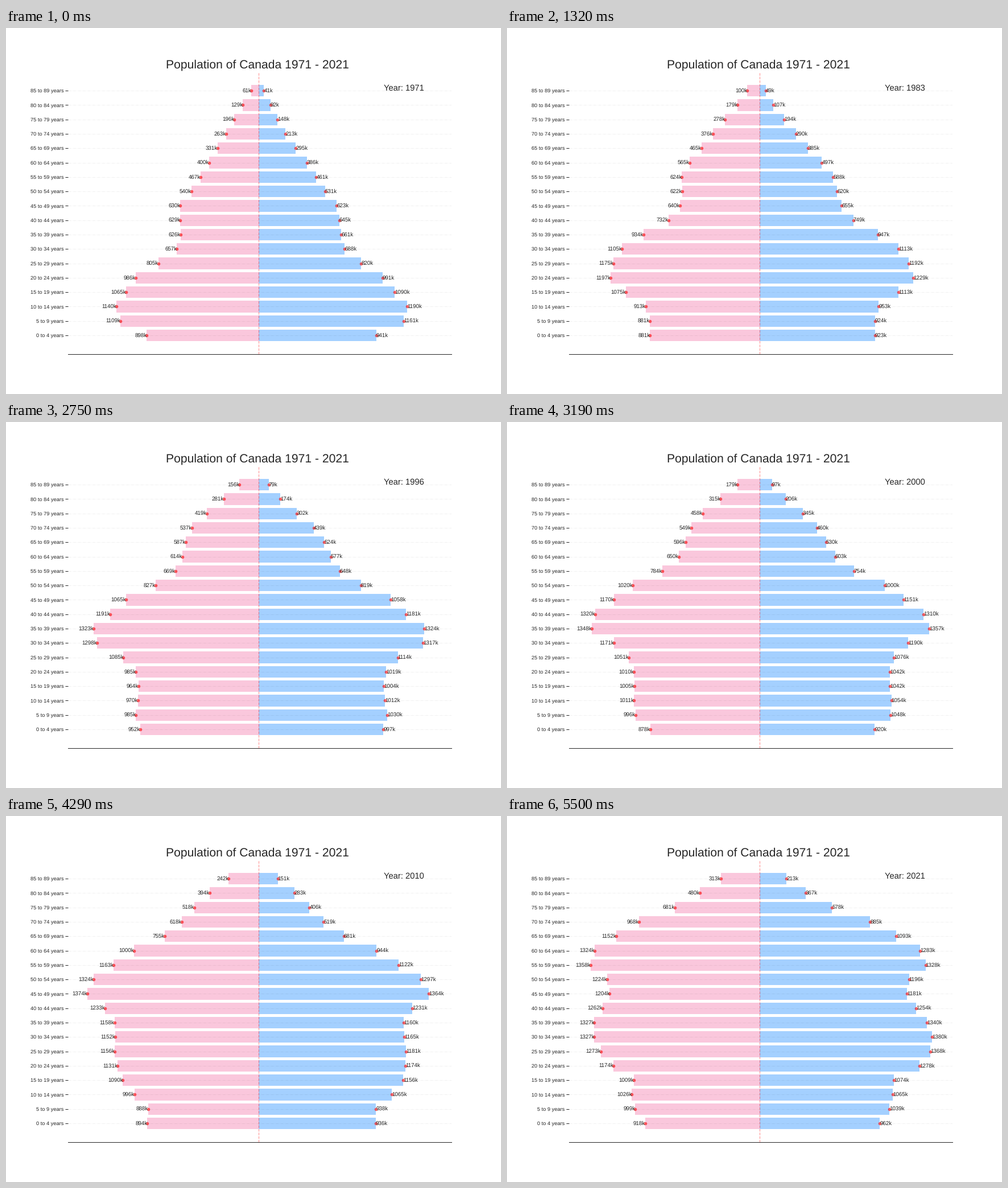
These frames come from a looping animation (870 by 643 pixels, 5610 ms). A matplotlib script:

```python
import numpy as np
import matplotlib.pyplot as plt
from matplotlib.animation import FuncAnimation

W, H, DPI = 870, 643, 72  # at 72 dpi one point is one pixel
INK = "0.15"
PINK, BLUE = "#fac7dc", "#a4d0ff"
FIRST, LAST = 1971, 2021
TOP = 17  # index of the oldest age group

plt.rcParams["font.family"] = "Liberation Sans"
plt.rcParams["text.hinting"] = "none"

# Bends of the women's age curve, {age group: thousands}
WOMEN = {
    1971: {0: 898, 1: 1109, 2: 1140, 3: 1065, 4: 986, 5: 805, 6: 657,
           7: 626, 8: 629, 9: 630, 10: 540, 12: 400, 17: 61},
    1991: {0: 957, 2: 927, 3: 937, 4: 1024, 5: 1236, 6: 1284, 7: 1174,
           8: 1062, 9: 830, 10: 668, 11: 619, 13: 588, 15: 367, 17: 131},
    2021: {0: 918, 1: 999, 2: 1026, 3: 1009, 4: 1174, 5: 1273, 6: 1327, 7: 1327,
           9: 1204, 10: 1224, 11: 1358, 12: 1324, 13: 1152, 14: 968, 15: 681, 17: 313},
}
# Men per woman by age group
MEN_RATIO = {
    1971: {0: 1.045, 2: 1.044, 4: 1.005, 7: 1.056, 9: 0.989, 12: 0.965, 14: 0.81, 17: 0.672},
    1991: {0: 1.047, 2: 1.052, 4: 1.036, 7: 1.0, 9: 1.017, 12: 0.946, 14: 0.773, 17: 0.473},
    2021: {0: 1.051, 2: 1.038, 4: 1.089, 7: 1.01, 9: 0.981, 12: 0.969, 14: 0.914, 17: 0.68},
}
# Girls aged 0 to 4, {year: thousands}
GIRLS = {1971: 898, 1974: 868, 1978: 862, 1987: 908, 1994: 968, 2003: 838, 2016: 946, 2021: 918}
BOYS_PER_GIRL = 1.048


def smooth(x, points):
    """Cubic Hermite curve through {x: y} points."""
    xs = np.array(list(points), float)
    ys = np.array(list(points.values()), float)
    slope = np.gradient(ys, xs)
    i = int(np.clip(np.searchsorted(xs, x, side="right") - 1, 0, len(xs) - 2))
    h = xs[i + 1] - xs[i]
    t = (x - xs[i]) / h
    return ((2 * t**3 - 3 * t**2 + 1) * ys[i] + (t**3 - 2 * t**2 + t) * h * slope[i]
            + (3 * t**2 - 2 * t**3) * ys[i + 1] + (t**3 - t**2) * h * slope[i + 1])


def women(year, age):
    return smooth(age, WOMEN[year])


def men(year, age):
    return women(year, age) * smooth(age, MEN_RATIO[year])


def profile(age):
    """Relative size of a cohort: migration adds young adults, then deaths thin it."""
    growth = 0.82 + 0.24 / (1 + np.exp(-0.9 * (age - 4.9)))
    survival = 1 / (1 + np.exp((age - TOP) / 1.2))
    return growth * survival


def population(census, birth_scale, year):
    """Follow every cohort as it ages between two census years."""
    years = list(WOMEN)
    i = 0 if year < years[1] else 1
    y0, y1 = years[i], years[i + 1]
    oldest = {y: census(y, TOP) for y in years}

    result = []
    for age in range(TOP + 1):
        start = max(y0, year - 5 * age)
        end = min(y1, year + 5 * (TOP - age))
        age0 = age - (year - start) / 5
        age1 = age + (end - year) / 5
        born_later = start > y0 or age == 0
        a = smooth(start, GIRLS) * birth_scale if born_later else census(y0, age0)
        b = smooth(end, oldest) if end < y1 else census(y1, age1)
        a, b = a / profile(age0), b / profile(age1)
        t = (year - start) / max(end - start, 1e-9)
        result.append((a + (b - a) * t) * profile(age))
    return np.array(result)


fig = plt.figure(figsize=(W / DPI, H / DPI), dpi=DPI, facecolor="white")
ax = fig.add_axes([0.125, 0.1094, 0.775, 0.77])
rows = np.arange(TOP + 1)
ax.set_xlim(-1530.5, 1544)
ax.set_ylim(-1.29, 18.29)
ax.set_xticks([])
ax.set_yticks(rows, [f"{5 * r} to {5 * r + 4} years" for r in rows])
ax.tick_params(axis="y", length=4.8, width=1, pad=2.8, color=INK,
               labelcolor=INK, labelsize=9.2)
for side in ("left", "right", "top"):
    ax.spines[side].set_visible(False)
ax.spines["bottom"].set(color=INK, linewidth=1)


def make_side(color, align):
    bars = ax.barh(rows, np.zeros(len(rows)), height=0.8, color=color,
                   linewidth=0, zorder=1)
    dots, = ax.plot(np.zeros(len(rows)), rows, "o", color="red", alpha=0.6,
                    markersize=5.6, markeredgewidth=0, zorder=4)
    labels = [ax.text(0, r, "", ha=align, va="center", fontsize=9.8,
                      color=INK, zorder=5) for r in rows]
    return bars, dots, labels


def set_side(side, values, sign):
    bars, dots, labels = side
    tips = sign * values
    dots.set_xdata(tips)
    for bar, label, tip, value in zip(bars, labels, tips, values):
        bar.set_width(tip)
        label.set_x(tip)
        label.set_text(f"{value:.0f}k")


left = make_side(PINK, "right")
right = make_side(BLUE, "left")
for r in rows:
    ax.axhline(r, color="black", alpha=0.07, linewidth=0.8, linestyle="-.", zorder=2)
ax.axvline(0, color="red", alpha=0.4, linewidth=1.2, linestyle="--", zorder=3)

fig.text(442.3 / W, 1 - 70.8 / H, f"Population of Canada {FIRST} - {LAST}",
         ha="center", va="baseline", fontsize=21.15, color=INK)
year_text = fig.text(664 / W, 1 - 110 / H, "", ha="left", va="baseline",
                     fontsize=14.8, color=INK)


def update(frame):
    year = FIRST + frame
    set_side(left, population(women, 1, year), -1)
    set_side(right, population(men, BOYS_PER_GIRL, year), 1)
    year_text.set_text(f"Year: {year}")
    return []


anim = FuncAnimation(fig, update, frames=LAST - FIRST + 1, interval=110,
                     repeat=True, repeat_delay=0, blit=False)
plt.show()
```
